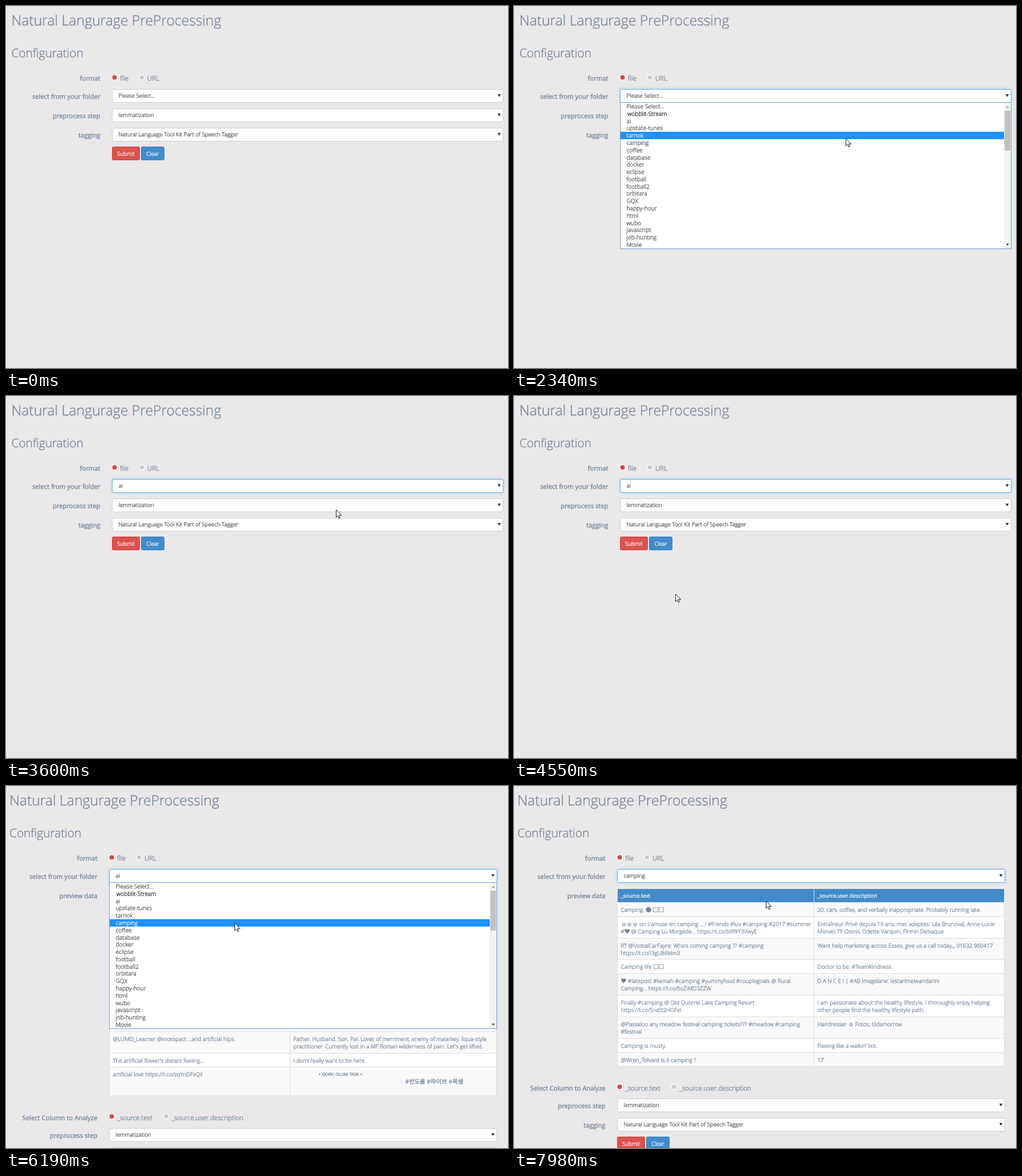
An HTML page for the animation above (8000 ms loop, 881 px wide and 636 px high).

```html
<!DOCTYPE html>
<html lang="en">
<head>
<meta charset="utf-8">
<title>Text preprocessing form</title>
<style>
html, body { margin: 0; width: 100%; height: 100%; overflow: hidden; background: #eae8e8; }
svg { display: block; }
text { font-family: "Open Sans", "DejaVu Sans", "Noto Sans CJK KR", "Noto Sans CJK", sans-serif; font-weight: 300;
  stroke-width: .3; text-rendering: geometricPrecision; white-space: pre; }
.plain { font-weight: 400; }
.focus { filter: drop-shadow(0 0 2.5px rgba(102, 175, 233, .5)); }
</style>
</head>
<body>
<svg width="881" height="636" viewBox="0 0 881 636">
  <g id="page"></g>
  <g id="pointer">
    <path id="arrow" d="M.5 0V13l3-2.8 2 4.6 2-.9-2-4.5h4.2z" fill="#fff" stroke="#222"/>
    <path id="beam" d="M-.5-4.5h2m2 0h2M-.5 8.5h2m2 0h2M2.5-4V8" fill="none" stroke="#333"/>
  </g>
</svg>
<script>
const LOOP = 8000, INK = "#6f829e", DARK = "#505050", BLUE = "#428bca", ROW = 12.8;

const folders = ["Please Select...", "wobblit-Stream", "ai", "upstate-tunes", "tarnok", "camping", "coffee",
  "database", "docker", "eclipse", "football", "football2", "orbitara", "GQX", "happy-hour", "html", "wubo",
  "javascript", "job-hunting", "Movie"];

// Each row holds two cells
const tables = {
  ai: { split: 498, rows: [
    ["RT @Deck_Finder: business intellegence approach PPT Slides -\nhttps://t.co/YMn4Ay8eGr #ppt #deckwriter #slide #business\n#intellegence #appro…",
     "Trainer turned Coach| Entrepreneur | Consultant, Certified PMP®, AIII, CFA|\naspiring Author |Learner |Listener|Speaker| Founder n Chief Innovator-\nConversantos™"],
    ["Artificial Grass For Sports artificial grass turf installers Artificial Grass\nProfessionals Turf Fields seo", "555-013-0199"],
    ["artificial love", "lol not ur girl anymore"],
    ["Narcisista artificial", "queeeen of disaster"],
    ["RT @Quibblora: BE SMART PEOPLE! Intellegence will get you miles on\nmiles in this world alone☺♞",
     "Leader of Thorns check my channel out!\nhttps://www.youtube.com/channel/UCQRmvkWeBsLpHT4ZyNcdoxB"],
    ["Use your intelligence to the fullest. #intellegence #talent #quotes\n#successquotes #wealth #entrepreneur… https://t.co/Qwyk3TTOFm",
     "Speaker, Transformational Mentor, Author, Success Strategiest, Spiritualist and\nknowledge expert. Free ebook https://www.vishwasutras.com/panchsutras-\nebook/"],
    ["@LUMO_Learner @mosspact ...and artificial hips.",
     "Father. Husband. Son. Pal. Lover of merriment, enemy of malarkey. liqua-style\npractitioner. Currently lost in a MF Roman wilderness of pain. Let's get lifted."],
    ["The artificial flower's distant feeling...", "I don't really want to be here."],
    ["artificial love https://t.co/zqYnDFsQiI", "\n\n"]] },
  camping: { split: 526, rows: [
    ["Camping. ● □□", "20, cars, coffee, and verbally inappropriate. Probably running late."],
    ["☺☺☺ on s'amuse en camping ....! #friends #luv #camping #2017 #summer\n#♥ @ Camping Lu Morgède… https://t.co/btR9Y3VwyE",
     "Entraîneur Privé depuis 16 ans, mes adeptes: Léa Brunoval, Anne-Lucie\nMorvel, TF Ostrel, Odette Varquin, Firmin Delvaque"],
    ["RT @VostalCarFayre: Who's coming camping ?? #camping\nhttps://t.co/i3gU86kbn3",
     "Want help marketing across Essex, give us a call today,,, 01632 960417"],
    ["Camping life □□", "Doctor to be. #TeamKindness"],
    ["♥ #latepost #kemah #camping #yummyfood #couplegoals @ Rural\nCamping… https://t.co/bzZiMD3ZZW",
     "D A N C E ! | #AB Imagelane: lestarimelwandarini"],
    ["Finally #camping @ Old Quorrel Lake Camping Resort\nhttps://t.co/5nd32HGFeI",
     "I am passionate about the healthy lifestyle. I thoroughly enjoy helping\nother people find the healthy lifestyle path."],
    ["@Passaloo any meadow festival camping tickets??? #meadow #camping\n#festival", "Hairdresser ☺ Fotos; tildamorrow"],
    ["Camping is musty.", "Flexing like a walkin' lick."],
    ["@Wren_Tolvard Is it camping ?", "17"]] }
};

// Pointer path: time, x, y
const path = [[70, 612, 586], [770, 592, 157], [1310, 592, 157], [1470, 594, 154], [1790, 593, 153],
  [1870, 593, 153], [2500, 578, 260], [2580, 578, 260], [2890, 575, 212], [3130, 579, 200], [3770, 579, 200],
  [4230, 300, 375], [4390, 277, 393], [4550, 283, 348], [4940, 283, 348], [5260, 416, 148], [5330, 416, 148],
  [5490, 415, 157], [5640, 415, 157], [6190, 401, 241], [6810, 401, 241], [6970, 396, 242], [7130, 395, 243],
  [7430, 395, 243], [7510, 394, 243], [7750, 395, 243], [7980, 442, 202]];

// A hairline stroke thickens the light face
const text = (x, y, s, size = 9.8, fill = INK, more = "") =>
  `<text x="${x}" y="${y}" font-size="${size}" fill="${fill}" stroke="${fill}" ${more}>${s}</text>`;
const rect = (x, y, w, h, fill, more = "") =>
  `<rect x="${x}" y="${y}" width="${w}" height="${h}" fill="${fill}" ${more}/>`;
const triangle = (x, y, h, fill) => `<path d="M${x - 2.7} ${y}h5.4l-2.7 ${h}z" fill="${fill}"/>`;
const label = (right, y, s) => text(right, y, s, 11.25, INK, 'text-anchor="end" class="plain"');

function radio(x, y, on) {
  return `<circle cx="${x}" cy="${y}" r="5.2" fill="#fff"/><circle cx="${x}" cy="${y}" r="${on ? 4 : 3.8}" fill="${on ? "#d24a46" : "#ccc"}"/>`;
}

function select(l, r, y, value, focus) {
  const edge = focus ? 'stroke="#66afe9" class="focus"' : 'stroke="#ccc"';
  return rect(l + .5, y + .5, r - l - 1, 23, "#fff", `rx="2" ${edge}`) +
    text(l + 11.5, y + 15, value, 9.8, DARK) + triangle(r - 7.5, y + 9, 5, "#333");
}

function button(x, y, w, s, fill, edge) {
  return rect(x + .5, y + .5, w - 1, 23, fill, `stroke="${edge}" rx="2"`) +
    text(x + w / 2, y + 15.5, s, 9.8, "#fff", 'text-anchor="middle"');
}

function table({ split, rows }) {
  const l = 181, r = 861;
  let y = 204;
  let out = rect(l, 180, r - l, 25, "#ddd") + rect(l + 1, 181, r - l - 2, 23, BLUE);
  ["_source.text", "_source.user.description"].forEach((s, c) => {
    out += text((c ? split : l) + 6.5, 196, s, 9.2, "#fff", 'class="plain"');
  });
  rows.forEach((cells, i) => {
    const lines = cells.map(c => c.split("\n"));
    const next = y + 11.9 + 12.95 * Math.max(lines[0].length, lines[1].length);
    const top = Math.round(y), h = Math.round(next) - top;
    out += rect(l, top, r - l, h, i % 2 ? "#fff" : "#f9f9f9") + rect(l, top, r - l, 1, "#ddd");
    lines.forEach((cell, c) => cell.forEach((s, n) => {
      out += text((c ? split : l) + 6.5, top + 17 + 13 * n, s);
    }));
    y = next;
  });
  y = Math.round(y);
  for (const x of [l, split, r - 1]) out += rect(x, 180, 1, y - 180, "#ddd");
  return { svg: out + rect(l, y, r - l, 1, "#ddd"), bottom: y };
}

function list(l, r, active) {
  const bar = r - 13;
  let out = rect(l + .5, 169.5, r - l - 1, 257, "#fff", 'stroke="#6f9bd8"') +
    rect(bar, 170, 12, 256, "#f1f1f1") + rect(bar + 1, 184, 10, 70, "#c1c1c1") +
    triangle(bar + 6, 179, -3.5, "#a3a3a3") + triangle(bar + 6, 417.5, 3.5, "#444") +
    rect(l + 1, Math.round(170 + active * ROW), bar - l - 1, 13, "#1e90ff");
  folders.forEach((s, i) => {
    const group = i == 1;
    out += text(l + (group ? 13 : 11.5), 180 + 12.79 * i, s, 10.2,
      i == active ? "#fff" : group ? "#222" : DARK);
  });
  return out;
}

function page({ data, value, focus, active }) {
  const l = data ? 181 : 186, r = data ? 862 : 873, x = data ? 6 : 9.5, right = l - 20.5;
  let y = 180;
  let out = text(x, 34, "Natural Langurage PreProcessing", 24.75) + text(x, 90, "Configuration", 20.8) +
    label(right, 131, "format") + radio(l + 4.5, 125.5, true) + text(l + 14, 131, "file", 11.5) +
    radio(l + 52.5, 125.5) + text(l + 62, 131, "URL", 11.5) +
    label(right, 163, "select from your folder") + select(l, r, 146, value, focus);
  if (data) {
    const { svg, bottom } = table(tables[data]);
    y = bottom + 57;
    out += label(right, 197, "preview data") + svg + label(right, y - 14, "Select Column to Analyze") +
      radio(185.5, y - 20.5, true) + text(195, y - 14, "_source.text", 11.5) +
      radio(281, y - 20.5) + text(290.5, y - 14, "_source.user.description", 11.5);
    if (data == "ai") out += text(548.5, 509, "+ QORV; OLUM; TASK +", 7.2, INK, 'class="plain"') +
      text(700.5, 523, "#반도율 #라이브 #목샘", 10.4);
  }
  // The open list is drawn last, over the fields below it
  return out + label(right, y + 17, "preprocess step") + select(l, r, y, "lemmatization") +
    label(right, y + 51, "tagging") +
    select(l, r, y + 34, "Natural Language Tool Kit Part of Speech Tagger") +
    button(l, y + 67, 49, "Submit", "#d9534f", "#d43f3a") + button(l + 51, y + 67, 41, "Clear", BLUE, "#357ebd") +
    (active < 0 ? "" : list(l, r, active));
}

function pointerAt(t) {
  const n = path.findIndex(p => p[0] > t);
  if (n < 0) return path[path.length - 1].slice(1);
  const a = path[Math.max(n - 1, 0)], b = path[n];
  const k = b[0] > a[0] ? (t - a[0]) / (b[0] - a[0]) : 0;
  return [1, 2].map(i => Math.round(a[i] + (b[i] - a[i]) * k));
}

const [pageEl, pointer, arrow, beam] = ["page", "pointer", "arrow", "beam"].map(id => document.getElementById(id));
const show = (el, on) => el.setAttribute("visibility", on ? "visible" : "hidden");
let shown = "";

function draw() {
  const t = performance.now() % LOOP, [x, y] = pointerAt(t);
  const value = t < 3520 ? folders[0] : t < 6500 ? "ai" : "camping";
  const open = t >= 850 && t < 3520 || t >= 5720 && t < 6500;
  const state = {
    data: t >= 7360 ? "camping" : t >= 4780 && t < 6580 ? "ai" : "",
    value,
    focus: t >= 930,
    active: !open ? -1 : y < 170 ? folders.indexOf(value) : Math.floor((y - 170) / ROW)
  };
  const key = JSON.stringify(state);
  if (key != shown) pageEl.innerHTML = page(state);
  shown = key;
  const typing = t >= 7360 && t < 7830;
  show(arrow, t >= 70 && !typing);
  show(beam, typing);
  pointer.setAttribute("transform", `translate(${x} ${y})`);
  requestAnimationFrame(draw);
}
draw();
</script>
</body>
</html>
```
